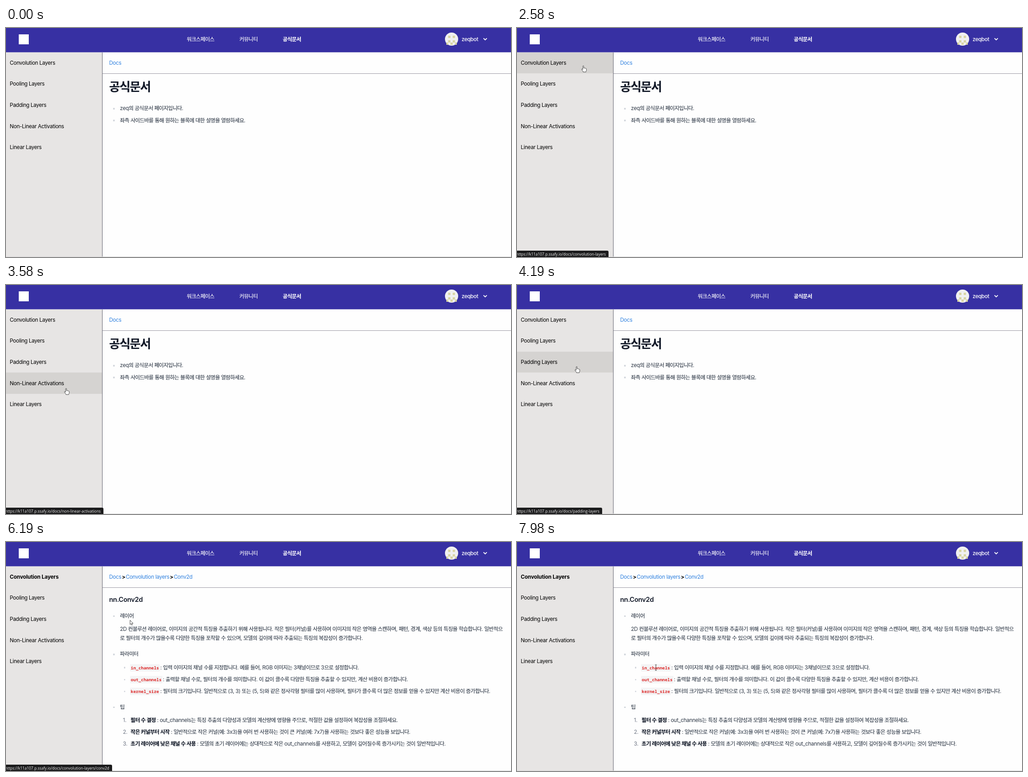
An HTML page that plays this animation: 1109x505 px, repeating every 8 s.

```html
<!DOCTYPE html>
<html lang="ko">
<head>
<meta charset="utf-8">
<title>Docs</title>
<style>
html, body { margin: 0; width: 100%; height: 100%; overflow: hidden; background: #fefefe; }
#stage {
  position: relative; width: 1109px; height: 505px; overflow: hidden;
  font: 400 11.65px/18px Inter, "Noto Sans CJK KR", sans-serif;
  font-optical-sizing: none; letter-spacing: -.028em; color: #000;
}
#stage div, #stage svg { position: absolute; }
.t { white-space: pre; }
.t i { font-style: normal; letter-spacing: -.056em; -webkit-text-stroke: .15px; }
#top { width: 1109px; height: 53px; background: #3730a3; border-bottom: 1px solid #8f8bc9; }
#side { top: 54px; width: 211px; height: 450px; background: #e7e5e4; border-right: 1px solid #63636f; }
#rule { left: 212px; top: 100px; width: 897px; height: 1px; background: #9a98a4; }
#base { top: 504px; width: 1109px; height: 1px; background: #dadada; }
#hover { width: 211px; height: 46.6px; background: #d5d3d1; }
.nav { color: #fff; font-weight: 500; }
.on { font-weight: 700; letter-spacing: -.012em; }
.link { color: #2f80df; }
.link b { color: #000; margin: 0 1px; }
.title { font-size: 26.2px; font-weight: 700; color: #111827; }
.head { font-size: 23.3px; font-weight: 700; letter-spacing: -.0145em; color: #2d2a80; }
.item { font-size: 14.56px; letter-spacing: -.034em; }
.name { font-size: 14.56px; font-weight: 600; color: #111827; }
.body { color: #2f3947; }
.body b { color: #111827; }
.num { color: #6b7280; }
code {
  font: 700 9.4px/1 "Noto Sans Mono", monospace; letter-spacing: 0; color: #dc2626;
  background: #f4f4f5; box-shadow: 0 0 0 1.5px #f4f4f5;
}
.dot { width: 3.8px; height: 3.8px; border-radius: 50%; background: #d1d5db; }
#url {
  left: -2px; top: 491px; height: 14px; padding-right: 6px; border-radius: 0 3px 0 0;
  background: #1c1c1d; color: #f2f2f2; white-space: pre;
  font: 8.43px/15px "Open Sans", sans-serif; letter-spacing: 0;
}
#cursor { left: 0; top: 0; overflow: visible; pointer-events: none; }
</style>
</head>
<body>
<div id="stage">
  <div id="top"></div>
  <div id="side"></div>
  <div id="hover"></div>
  <div id="rule"></div>
  <div id="base"></div>
  <svg width="1109" height="53">
    <rect x="28" y="14" width="22" height="22" fill="#fff"/>
    <circle cx="978.5" cy="24.5" r="14.5" fill="#f0f0f0"/>
    <path d="M971 19.5h5m5 0h5M971 29.5h5m5 0h5M967 34.5h4m5 0h5m5 0h4" stroke="#d8d5a4" stroke-width="5"/>
    <path d="M1048.6 22.6l3.7 3.6 3.7-3.6" fill="none" stroke="#fff" stroke-width="1.8"/>
  </svg>
  <div id="frame"></div>
  <div id="intro"></div>
  <div id="layers"></div>
  <div id="conv"></div>
  <div id="url"></div>
  <svg id="cursor" width="20" height="20">
    <path id="arrow" d="M.4 .4v9.6l2.2-2 1.5 3.3 1.5-.7-1.4-3.2h2.9z" fill="#fff" stroke="#222" stroke-width=".8"/>
    <path id="hand" d="M-1 1.1Q-1 0 0 0T1 1.1V5l1.3-.3 .9 .7 1.4-.2 .8 .8q1.4-.2 1.4 1.2v2.6q0 1.6-1 2.6v1.3H-.4v-1.1L-3.6 8.4q-.5-1.4 .7-1.5L-1 8.3z" fill="#fff" stroke="#222" stroke-width=".8"/>
    <path id="beam" d="M-2-6.2h1.4L0-5.8 .6-6.2H2M0-5.8V5.8M-2 6.2h1.4L0 5.8 .6 6.2H2" fill="none" stroke="#333" stroke-width=".9"/>
  </svg>
</div>
<script>
const TOP = 53.5, ROW = 46.6, SIDE = 211, LEFT = 226.5, INDENT = 250.3;
const $ = id => document.getElementById(id);

function add(page, cls, x, y, html = '') {
  const el = document.createElement('div');
  el.className = cls;
  el.style.left = x + 'px';
  el.style.top = y + 'px';
  el.innerHTML = html;
  $(page).append(el);
  return el;
}
// y is the middle of the text line
const text = (page, x, y, html, cls = 'body') =>
  add(page, 't ' + cls, x, y - 9, html.replace(/[가-힣]+/g, '<i>$&</i>'));
const bullet = (page, x, y, html) => {
  add(page, 'dot', x - 15.4, y - 1.2);
  text(page, x, y, html);
};
const crumbs = (page, ...parts) => text(page, LEFT, 77, parts.join('<b>&gt;</b>'), 'link');

text('frame', 397, 24.5, '워크스페이스', 'nav');
text('frame', 512.5, 24.5, '커뮤니티', 'nav');
text('frame', 607.7, 24.5, '공식문서', 'nav on');
text('frame', 1000.5, 24.5, 'zeqbot', 'nav');

const names = ['Convolution Layers', 'Pooling Layers', 'Padding Layers', 'Non-Linear Activations', 'Linear Layers'];
const rows = names.map((name, i) => text('frame', 8.3, TOP + ROW * (i + .5), name, ''));

crumbs('intro', 'Docs');
text('intro', LEFT, 130, '공식문서', 'title');
bullet('intro', INDENT, 177.3, 'zeq의 공식문서 페이지입니다.');
bullet('intro', INDENT, 203.5, '좌측 사이드바를 통해 원하는 블록에 대한 설명을 열람하세요.');

crumbs('layers', 'Docs', 'Convolution layers');
text('layers', LEFT, 133, 'Convolution Layers', 'head');
text('layers', 248.3, 168.5, 'conv2d', 'item');
text('layers', 248.3, 197.7, 'convtranspose2d', 'item');

crumbs('conv', 'Docs', 'Convolution layers', 'Conv2d');
text('conv', LEFT, 127.3, 'nn.Conv2d', 'name');
bullet('conv', INDENT, 162.7, '레이어');
text('conv', INDENT, 191.8, '2D 컨볼루션 레이어로, 이미지의 공간적 특징을 추출하기 위해 사용됩니다. 작은 필터(커널)를 사용하여 이미지의 작은 영역을 스캔하며, 패턴, 경계, 색상 등의 특징을 학습합니다. 일반적으');
text('conv', INDENT, 212.2, '로 필터의 개수가 많을수록 다양한 특징을 포착할 수 있으며, 모델의 깊이에 따라 추출되는 특징의 복잡성이 증가합니다.');
bullet('conv', INDENT, 247, '파라미터');
[
  ['in_channels', '입력 이미지의 채널 수를 지정합니다. 예를 들어, RGB 이미지는 3채널이므로 3으로 설정합니다.'],
  ['out_channels', '출력할 채널 수로, 필터의 개수를 의미합니다. 이 값이 클수록 다양한 특징을 추출할 수 있지만, 계산 비용이 증가합니다.'],
  ['kernel_size', '필터의 크기입니다. 일반적으로 (3, 3) 또는 (5, 5)와 같은 정사각형 필터를 많이 사용하며, 필터가 클수록 더 많은 정보를 얻을 수 있지만 계산 비용이 증가합니다.']
].forEach(([key, note], i) => bullet('conv', 274, 276.5 + 26.2 * i, `<code>${key}</code> : ${note}`));
bullet('conv', INDENT, 363.7, '팁');
[
  ['필터 수 결정', 'out_channels는 특징 추출의 다양성과 모델의 계산량에 영향을 주므로, 적절한 값을 설정하여 복잡성을 조절하세요.'],
  ['작은 커널부터 시작', '일반적으로 작은 커널(예: 3x3)을 여러 번 사용하는 것이 큰 커널(예: 7x7)을 사용하는 것보다 좋은 성능을 보입니다.'],
  ['초기 레이어에 낮은 채널 수 사용', '모델의 초기 레이어에는 상대적으로 작은 out_channels를 사용하고, 모델이 깊어질수록 증가시키는 것이 일반적입니다.']
].forEach(([tip, note], i) => {
  const y = 393 + 26.1 * i;
  text('conv', 256.8, y, i + 1 + '.', 'num');
  text('conv', 273.6, y, `<b>${tip}</b> : ${note}`);
});

// Pointer stops: time, x, y
const stops = [
  [1070, 1103, 490], [1160, 1085, 488], [1410, 1085, 488], [1930, 295, 231], [2230, 200, 109],
  [2500, 150, 80], [3040, 132, 170], [3360, 134, 264], [3580, 132, 228], [3840, 132, 228],
  [4190, 131, 180], [4580, 160, 92], [4980, 160, 92], [5050, 172, 114], [5480, 272, 172],
  [6850, 272, 172], [7080, 275, 131], [7630, 292, 245], [7820, 301, 302], [7980, 305, 277]
];
const speed = (i, c) => (stops[i + 1][c] - stops[i][c]) / (stops[i + 1][0] - stops[i][0]);

// Smooth curve through the stops that never overshoots
function tangent(i, c) {
  if (i === 0 || i === stops.length - 1) return 0;
  const a = speed(i - 1, c), b = speed(i, c);
  return a * b > 0 ? 2 * a * b / (a + b) : 0;
}
function pointer(t) {
  const next = stops.findIndex(s => s[0] > t);
  if (next < 1) return (next ? stops.at(-1) : stops[0]).slice(1);
  const i = next - 1, span = stops[next][0] - stops[i][0], s = (t - stops[i][0]) / span;
  return [1, 2].map(c => {
    const a = stops[i][c], b = stops[next][c];
    return a + (b - a) * s * s * (3 - 2 * s) +
      span * s * (1 - s) * (tangent(i, c) * (1 - s) - tangent(next, c) * s);
  });
}

const pageAt = t => t < 4580 ? 'intro' : t < 6070 ? 'layers' : 'conv';
function rowAt(t) {
  const [x, y] = pointer(t);
  return x < SIDE ? Math.floor((y - TOP) / ROW) : -1;
}
function overItem(t) {
  const [x, y] = pointer(t);
  return pageAt(t) === 'layers' && x > 248 && Math.abs(y - 168.5) < 13;
}
function linkAt(t) {
  if (overItem(t) || pageAt(t) === 'conv') return 'convolution-layers/conv2d';
  const name = names[rowAt(t)];
  return name ? name.toLowerCase().replace(' ', '-') : '';
}
function kindAt(t) {
  if (t < stops[0][0]) return '';
  if (rowAt(t) >= 0 || overItem(t)) return 'hand';
  return document.elementFromPoint(...pointer(t))?.closest('.t') ? 'beam' : 'arrow';
}
const show = (id, on) => { $(id).style.display = on ? '' : 'none'; };

function draw(t) {
  const page = pageAt(t), row = rowAt(t - 30), link = linkAt(t - 60);
  ['intro', 'layers', 'conv'].forEach(p => show(p, p === page));
  rows[0].classList.toggle('on', page !== 'intro');
  show('hover', row >= 0);
  $('hover').style.top = TOP + ROW * row + 'px';
  show('url', link);
  $('url').textContent = 'https://k11a107.p.ssafy.io/docs/' + link;
  $('url').style.opacity = Math.min(1, Math.max(0, (6620 - t) / 120));
  const kind = kindAt(t), [x, y] = pointer(t);
  ['arrow', 'hand', 'beam'].forEach(k => show(k, k === kind));
  $('cursor').style.transform = `translate(${x}px, ${y}px)`;
}

const start = performance.now();
function tick() {
  draw((performance.now() - start) % 8000);
  requestAnimationFrame(tick);
}
tick();
</script>
</body>
</html>
```
